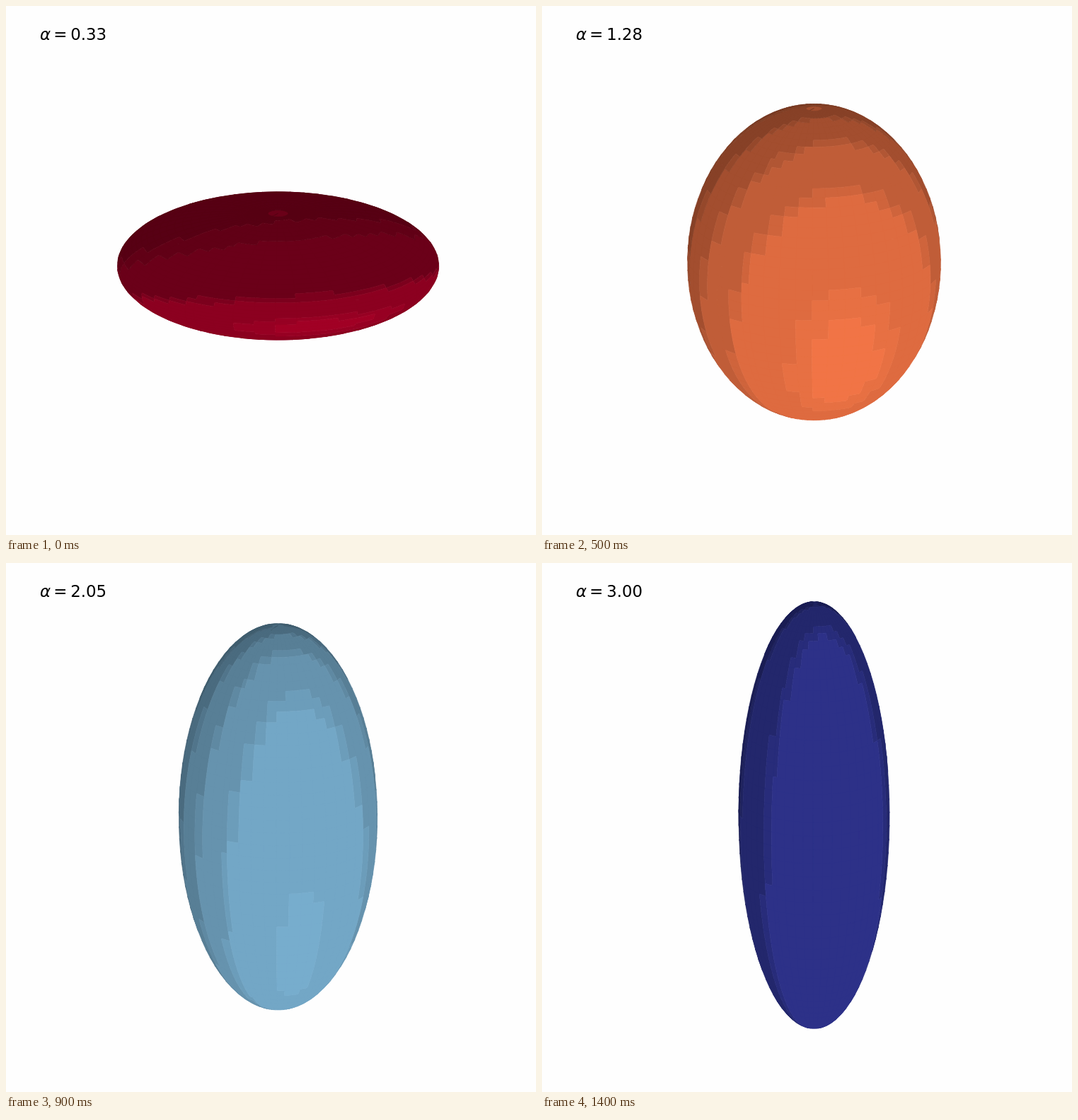
Write an HTML page that moves like this. It is 749 px wide and 748 px high and loops after 1.5 s.

```html
<!DOCTYPE html>
<html lang="en">
<head>
<meta charset="utf-8">
<title>Spheroid aspect ratio</title>
<style>
html, body { margin: 0; width: 100%; height: 100%; overflow: hidden; background: #fefefe; }
svg { display: block; width: 100vw; height: 100vh; }
text { font: 22.9px "DejaVu Sans", sans-serif; fill: #000; }
.var { font-style: italic; }
path { stroke-width: .7; stroke-linejoin: round; }
</style>
</head>
<body>
<svg viewBox="0 0 749 748" preserveAspectRatio="none">
  <g id="body"></g>
  <text class="var" x="48" y="48">α</text>
  <text x="67.2" y="48">=</text>
  <text id="value" x="91.2" y="48"></text>
</svg>
<script>
const STEPS = 15, STEP_MS = 100, GRID = 100, STRIDE = 2;
const RAD = Math.PI / 180;
const sinA = Math.sin(30 * RAD), cosA = Math.cos(30 * RAD);
const sinE = Math.sin(20 * RAD), cosE = Math.cos(20 * RAD);
const CX = 384.5, CY = 363.8, DIST = 4000, Y_SCALE = 0.997;
const LIGHT = [-2 / 3, -2 / 3, 1 / 3];

// Both ends of a diverging red-yellow-blue scale
const WARM = [[165, 0, 38], [215, 48, 39], [244, 109, 67], [253, 174, 97]];
const COOL = [[171, 217, 233], [116, 173, 209], [69, 117, 180], [49, 54, 149]];

const sub = (a, b) => a.map((v, i) => v - b[i]);
const dot = (a, b) => a[0] * b[0] + a[1] * b[1] + a[2] * b[2];
const cross = (a, b) => [
  a[1] * b[2] - a[2] * b[1], a[2] * b[0] - a[0] * b[2], a[0] * b[1] - a[1] * b[0]
];

function mix(stops, t) {
  const pos = t * (stops.length - 1);
  const k = Math.min(stops.length - 2, Math.floor(pos));
  return stops[k].map((v, c) => v + (stops[k + 1][c] - v) * (pos - k));
}

function baseColor(i) {
  const t = i / 7;
  return t <= 1 ? mix(WARM, t) : mix(COOL, t - 1);
}

// Rounds brightness to bands of equal colour distance, with a thin blend between bands
function makeTone(base, alpha) {
  const width = 34 / Math.hypot(...base);
  const top = 0.95 + 0.009 * alpha * alpha;
  const middle = n => {
    const low = top + n * width;
    return (Math.max(low, 0.5) + Math.min(low + width, 1)) / 2;
  };
  return s => {
    const pos = (s - top) / width, n = Math.floor(pos);
    return pos - n < 0.16 ? (middle(n) + middle(n - 1)) / 2 : middle(n);
  };
}

function project([x, y, z]) {
  const near = x * cosA + y * sinA;
  const k = 1 / (1 - (near * cosE + z * sinE) / DIST);
  return [
    CX + (y * cosA - x * sinA) * k,
    CY - (z * cosE - near * sinE) * k * Y_SCALE
  ];
}

function shade(ring) {
  const n = ring.length;
  const q = ring[Math.floor(n / 3)], r = ring[Math.floor(2 * n / 3)];
  const normal = cross(sub(ring[0], q), sub(q, r));
  const len = Math.hypot(...normal);
  return 0.65 + (len ? 0.35 * dot(normal, LIGHT) / len : 0);
}

// Grid indices around one cell, clockwise as seen from outside
function perimeter(r0, r1, c0, c1) {
  const out = [];
  for (let c = c0; c < c1; c++) out.push([r0, c]);
  for (let r = r0; r < r1; r++) out.push([r, c1]);
  for (let c = c1; c > c0; c--) out.push([r1, c]);
  for (let r = r1; r > r0; r--) out.push([r, c0]);
  return out;
}

function area(pts) {
  return pts.reduce((sum, p, i) => {
    const q = pts[(i + 1) % pts.length];
    return sum + p[0] * q[1] - q[0] * p[1];
  }, 0);
}

function buildStep(i) {
  const alpha = 0.33 + (3 - 0.33) * i / (STEPS - 1);
  const a = 361 / Math.sqrt(2.417 + alpha * alpha) - 0.35;
  const c = a * alpha;
  const last = GRID - 1;
  const point = ([row, col]) => {
    const v = Math.PI * row / last, u = 2 * Math.PI * col / last;
    return [a * Math.sin(v) * Math.cos(u), a * Math.sin(v) * Math.sin(u), c * Math.cos(v)];
  };
  const base = baseColor(i), tone = makeTone(base, alpha);
  const paths = {};
  for (let r = 0; r < last; r += STRIDE) {
    for (let k = 0; k < last; k += STRIDE) {
      const ring = perimeter(r, Math.min(r + STRIDE, last), k, Math.min(k + STRIDE, last)).map(point);
      const flat = ring.map(project);
      if (area(flat) <= 0) continue;
      const level = tone(shade(ring));
      const color = `rgb(${base.map(v => Math.round(v * level)).join()})`;
      const d = "M" + flat.map(p => p[0].toFixed(2) + " " + p[1].toFixed(2)).join("L") + "Z";
      paths[color] = (paths[color] || "") + d;
    }
  }
  const markup = Object.entries(paths)
    .map(([color, d]) => `<path d="${d}" fill="${color}" stroke="${color}"/>`)
    .join("");
  return { markup, label: alpha.toFixed(2) };
}

const steps = Array.from({ length: STEPS }, (_, i) => buildStep(i));
const body = document.getElementById("body");
const value = document.getElementById("value");
let shown = -1;

function render(ms) {
  const i = Math.floor(ms / STEP_MS) % STEPS;
  if (i === shown) return;
  shown = i;
  body.innerHTML = steps[i].markup;
  value.textContent = steps[i].label;
}

function tick(now) {
  render(Math.max(0, now));
  requestAnimationFrame(tick);
}

render(0);
requestAnimationFrame(tick);
</script>
</body>
</html>
```
